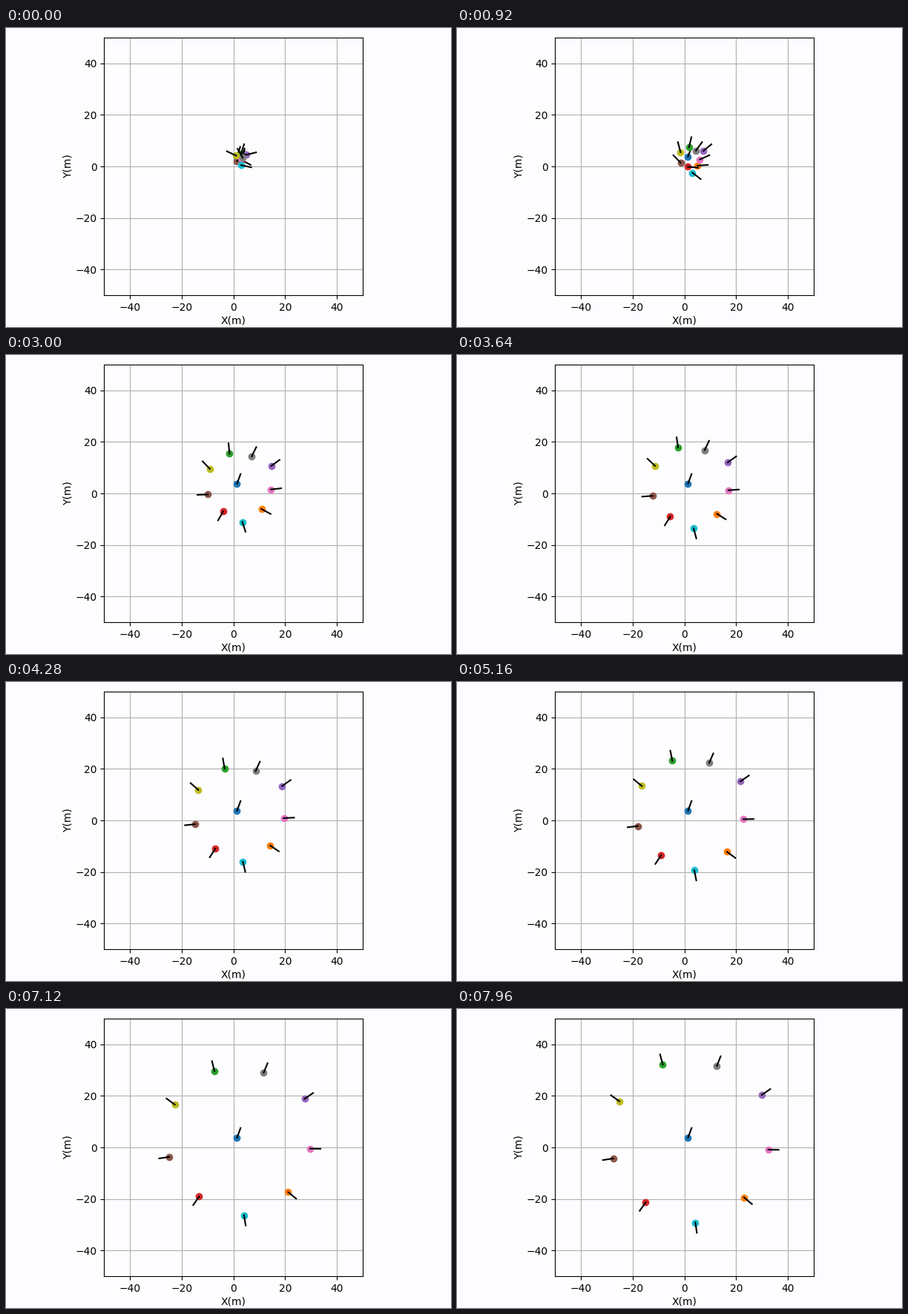
Recreate the animation shown at these times as a matplotlib script. Size 600 px wide and 404 px high, loop 8000 ms.

```python
import numpy as np
import matplotlib.pyplot as plt
from matplotlib.animation import FuncAnimation

W, H, DPI = 600, 404, 100
FRAMES, STEP = 200, 40
PAPER = "#fdfcfe"
ARM = 4.0  # heading line length in metres
HOLD = 0.12  # seconds before anything moves

# one entry per robot, in colour cycle order; robot 0 stays in the middle
START = np.array([(1.4, 3.8), (3.1, 2.5), (2.9, 4.8), (3.1, 2.2), (4.9, 4.5),
                  (1.4, 2.1), (3.1, 3.1), (3.6, 3.4), (1.1, 4.2), (3.0, 0.5)])
FIRST = np.radians([72, -28, 72, 72, 14, 40, 72, 120, 155, -12])

# the other nine leave in evenly spaced directions
SLOT = np.array([8, 3, 6, 1, 5, 0, 2, 4, 7])
AWAY = np.radians(-7.6 + 40 * SLOT)
COURSE = np.vstack([(0, 0), np.column_stack([np.cos(AWAY), np.sin(AWAY)])])


def distance(t):
    """Metres travelled: a steady run that slows a little."""
    s = max(t - 0.247, 0)
    return 4.385 * s - 0.0703 * s * s


def headings(pos, t):
    """Turn from the first heading to facing away from the origin."""
    out = np.arctan2(pos[:, 1], pos[:, 0])
    turn = (out - FIRST + np.pi) % (2 * np.pi) - np.pi
    return FIRST + turn * np.clip((t - HOLD) / 0.4, 0, 1)


fig = plt.figure(figsize=(W / DPI, H / DPI), dpi=DPI, facecolor=PAPER)
ax = fig.add_axes([132.4 / W, 42.7 / H, 348.4 / W, 348.4 / H], facecolor=PAPER)
ax.set(xlim=(-50, 50), ylim=(-50, 50))
ax.set_xlabel("X(m)", labelpad=2.4)
ax.set_ylabel("Y(m)", labelpad=2)
ax.set_xticks(range(-40, 41, 20))
ax.set_yticks(range(-40, 41, 20))
ax.grid(True)

dots, arms = [], []
for i in range(len(START)):
    dots += ax.plot([], [], "o", color=f"C{i}")
    arms += ax.plot([], [], "k-")


def draw(frame):
    t = frame * STEP / 1000
    pos = START + COURSE * distance(t)
    for dot, arm, (x, y), a in zip(dots, arms, pos, headings(pos, t)):
        dot.set_data([x], [y])
        arm.set_data([x, x + ARM * np.cos(a)], [y, y + ARM * np.sin(a)])
    return dots + arms


anim = FuncAnimation(fig, draw, frames=FRAMES, interval=STEP,
                     init_func=lambda: draw(0), repeat=True, repeat_delay=0)
plt.show()
```
